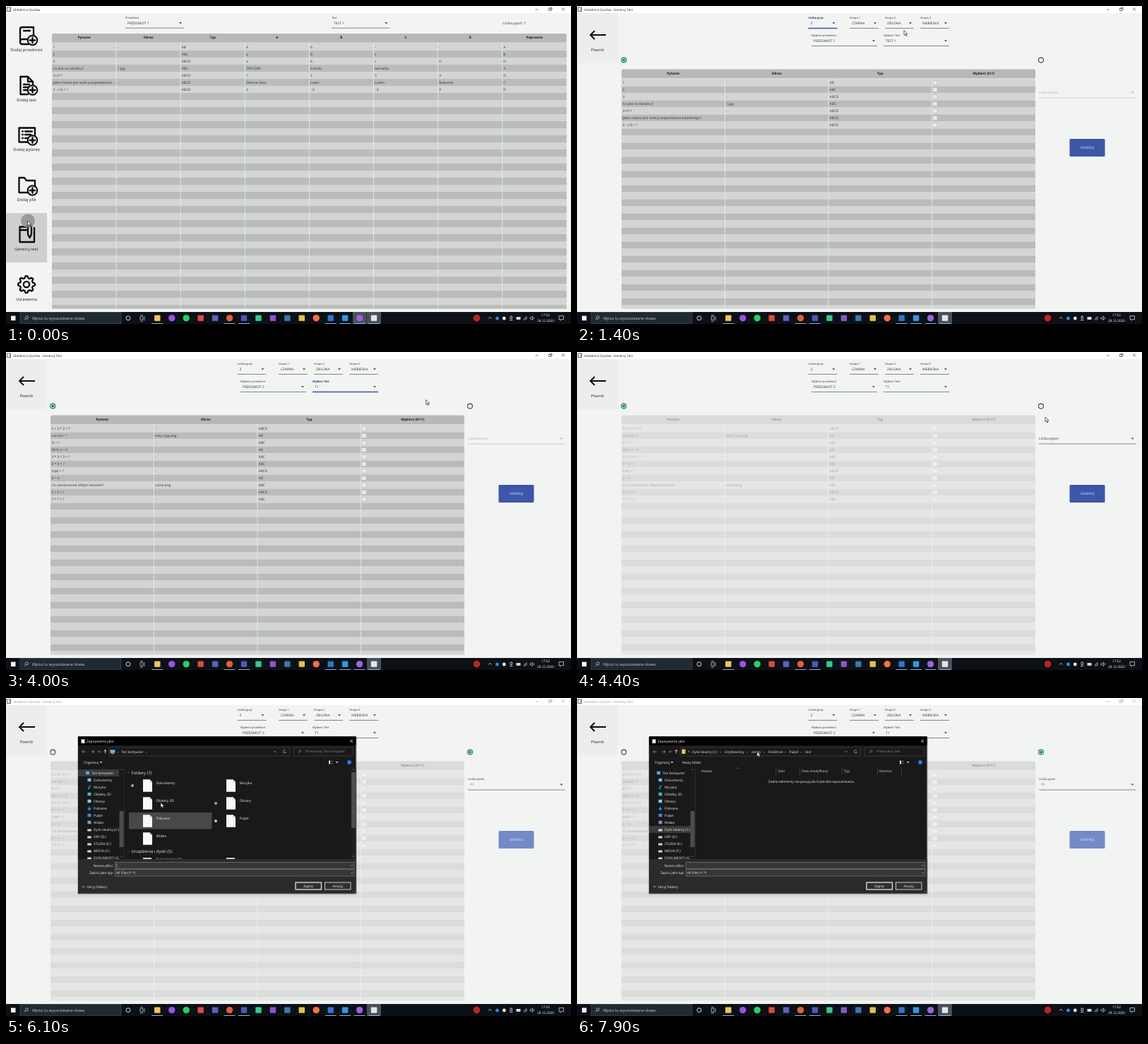
An HTML page for the animation above (8 s loop, 800 by 450 pixels).

```html
<!DOCTYPE html>
<html lang="pl">
<head>
<meta charset="utf-8">
<title>Układnica Quizów</title>
<style>
html, body { margin: 0; width: 100%; height: 100%; overflow: hidden; background: #f1f4f1; }
svg { display: block; width: 800px; height: 450px; }
text { font-family: "Open Sans", "Noto Sans", sans-serif; text-rendering: geometricPrecision; white-space: pre; }
.icon { fill: none; stroke: #0a0a0a; stroke-width: 2.3; stroke-linejoin: round; stroke-linecap: round; }
</style>
</head>
<body>
<svg id="stage" viewBox="0 0 800 450"></svg>
<script>
const LOOP = 8000, STEP = 100;
const INK = '#303330', BLUE = '#3f51b5';

// drawing helpers
const rect = (x, y, w, h, fill, more = '') =>
  `<rect x="${x}" y="${y}" width="${w}" height="${h}" fill="${fill}" ${more}/>`;
const disc = (x, y, r, fill, more = '') =>
  `<circle cx="${x}" cy="${y}" r="${r}" fill="${fill}" ${more}/>`;
const path = (d, stroke, width = 0.8, more = '') =>
  `<path d="${d}" fill="none" stroke="${stroke}" stroke-width="${width}" ${more}/>`;
const text = (x, y, s, size = 4.8, fill = INK, more = '') =>
  `<text x="${x}" y="${y + size * 0.36}" font-size="${size}" fill="${fill}" ${more}>${s}</text>`;
const MID = 'text-anchor="middle"', BOLD = MID + ' font-weight="700"';
const group = (s, more = '') => `<g ${more}>${s}</g>`;
const during = (from, to, s, more = '') => group(s, `data-from="${from}" data-to="${to}" ${more}`);
const arrow = (x, y, fill = '#444') => `<path d="M${x - 2} ${y - 1}h4l-2 2.2z" fill="${fill}"/>`;

function combo(x, right, y, label, value, focus) {
  const line = (c, w) => path(`M${x} ${y + 7.2}H${right}`, c, w);
  return text(x, y - 7.5, label, 4) + text(x + 3, y, value) + arrow(right - 5, y) + line('#686b68', 0.8) +
    (focus ? during(...focus, line(BLUE, 1.3) + text(x, y - 7.5, label, 4, BLUE)) : '');
}

// striped table body with header
function grid(x, top, cols, width, heads) {
  let s = '';
  const right = x + cols * width, first = top + 14;
  for (let y = first, i = 0; y < 428.5; y += 10, i++)
    s += rect(x, y, right - x, Math.min(10, 428.5 - y), i % 2 ? '#b9bcb9' : '#d2d5d2');
  s += rect(x, top + 10, right - x, 4, '#d2d5d2');
  for (let i = 1; i < cols; i++)
    s += path(`M${x + i * width} ${top + 12}V428.5`, '#e6e9e6', 0.9);
  s += rect(x, top + 1, right - x, 11.5, '#9fa29f', 'rx="3" opacity=".5"') +
    rect(x, top, right - x, 11.5, '#b6b9b6', 'rx="3"');
  heads.forEach((h, i) => s += text(x + (i + 0.5) * width, top + 5.6, h, 4.7, '#161816', BOLD));
  return s;
}
const cells = (x, top, width, rows) => rows.map((row, r) =>
  row.split('|').map((c, i) => text(x + 1.6 + i * width, top + 19 + r * 10, c)).join('')).join('');

// start page
const plus = (x, y) => disc(x, y, 6.8, '#f1f4f1', 'stroke-width="2"') +
  `<path d="M${x - 3.8} ${y}h7.6M${x} ${y - 3.8}v7.6"/>`;
const gear = () => {
  let d = '';
  for (let i = 0; i < 32; i++) {
    const a = (i - 1.5) * Math.PI / 16, r = i % 4 === 1 || i % 4 === 2 ? 12 : 9.2;
    d += `${i ? 'L' : 'M'}${(29 + r * Math.sin(a)).toFixed(1)} ${(394 - r * Math.cos(a)).toFixed(1)}`;
  }
  return `<path d="${d}Z"/><circle cx="29" cy="394" r="4.2"/>`;
};
const menu = [
  ['Dodaj przedmiot', '<path d="M39 43V30H23q-3 0-3 3v18q0 3 3 3h9M20 51q0-4 3-4h9M25 35h9"/>' + plus(37.5, 48.5)],
  ['Dodaj test', '<path d="M31 125H20.500V100H31l7 7v6M31 100v7h7M25 111h8M25 115h6M25 119h5"/>' + plus(37.500, 119)],
  ['Dodaj pytanie', '<path d="M31 192.500H18.500v-20H41v12M23 177.500h1M27 177.500h10M23 182h1M27 182h8M23 187h1M27 187h4"/>' + plus(37.500, 190)],
  ['Dodaj plik', '<path d="M31 264H18.500V243H26l3 4h12v8"/>' + plus(37.500, 261)],
  ['Generuj test', '<path d="M40 314v20H19.500V312.500H31M20 317h10M31 311h5v12l-2.500 5l-2.500-5z"/>'],
  ['Ustawienia', gear()]
];
const heads1 = ['Pytanie', 'Obraz', 'Typ', 'A', 'B', 'C', 'D', 'Poprawne'];
const rows1 = [
  '1|-|AB|A|b|-|-|A', '2|-|ABC|a|B|c|-|B', '3|-|ABCD|a|b|c|D|D',
  'Co jest na obrazku?|1.jpg|ABC|TAPCZAN|krzesło|wersalka|-|A', '2+2=?|-|ABCD|1|2|3|4|D',
  'Jakie miasto jest stolicą województwa ...|-|ABCD|Zielona Góra|Lubin|Lublin|Białystok|C',
  '3 - (-5) = ?|-|ABCD|3|- 2|- 8|8|D'
];
const startPage = rect(0, 293, 58, 70, '#cdd0cd') +
  menu.map(([name, icon], i) => group(icon, 'class="icon"') + text(29, 62 + i * 70.6, name, 5.8, '#222', MID)).join('') +
  combo(169, 252, 24, 'Przedmiot', 'PRZEDMIOT 1') + combo(461, 543.5, 24, 'Test', 'TEST 1') +
  text(703, 24, 'Liczba pytań: 7') +
  grid(65, 39, 8, 91.1, heads1) + cells(65, 39, 91.1, rows1) +
  disc(31, 304, 9.8, '#8b8d8b', 'opacity=".8"');

// generator page
const rows2 = [
  '1|-|AB', '2|-|ABC', '3|-|ABCD', 'Co jest na obrazku?|1.jpg|ABC', '2+2=?|-|ABCD',
  'Jakie miasto jest stolicą województwa lubelskiego?|-|ABCD', '3 - (-5) = ?|-|ABCD'
];
const rows3 = [
  '2 + 2 * 2 = ?|-|ABCD', 'cos (α) = ?|Katy_tryg.png|AB', '5! = ?|-|ABC', '98 % 2 = 0|-|AB',
  '3 * 3 * 3 = ?|-|ABC', '9 * 9 = ?|-|ABC', 'ln(e) = ?|-|ABCD', 'π = e|-|AB',
  'Co zaznaczonoe żółtym kolorem?|suma.png|ABC', '2 + 2 = ?|-|ABCD', '7 * 7 = ?|-|ABC'
];
const picker = rows => grid(63, 89.5, 4, 146.5, ['Pytanie', 'Obraz', 'Typ', `Wybierz (0/${rows.length})`]) +
  cells(63, 89.5, 146.5, rows) +
  rows.map((_, i) => rect(503.7, 105.4 + i * 10, 6.4, 6.2, '#e9ebe9', 'rx=".8" stroke="#a9aca9" stroke-width=".5"')).join('');
const radio = (x, on) => disc(x, 76.6, 3.5, on ? '#dcebe4' : 'none', `stroke="${on ? '#0f8063' : '#444'}" stroke-width="1.1"`) +
  (on ? disc(x, 76.6, 1.9, '#0f8063') : '');
const button = (fill, ink = '#e8ecf8') => rect(697.5, 188, 50, 25, fill, 'rx="1.5"') + text(722.5, 200.6, 'GENERUJ', 4.6, ink, MID);
const countLine = path('M654 130H791.5', '#686b68') + arrow(786.5, 122.5);
const countEmpty = text(654, 122.5, 'Liczba pytań') + countLine;

const makerPage = rect(0, 10, 58, 71, '#ebeeeb') +
  path('M41 41H19M25 35l-6 6l6 6', '#0a0a0a', 1.9) + text(29, 62, 'Powrót', 5.6, '#222', MID) +
  during(300, 1000, combo(327.500, 368.500, 24.300, 'Liczba grup', '1')) +
  during(1000, LOOP, combo(327.5, 368.5, 24.3, 'Liczba grup', '3', [1000, 1700])) +
  combo(386, 427, 24.3, 'Grupa 1', 'CZARNA') +
  during(1000, LOOP, combo(436, 477, 24.3, 'Grupa 2', 'ZIELONA') + combo(486, 527, 24.3, 'Grupa 3', 'NIEBIESKA')) +
  during(300, 2800, combo(332, 425, 49.3, 'Wybierz przedmiot', 'PRZEDMIOT 1', [1700, 2800]) +
    combo(434, 527, 49.3, 'Wybierz Test', 'TEST 1') + picker(rows2)) +
  during(2800, LOOP, combo(332, 425, 49.3, 'Wybierz przedmiot', 'PRZEDMIOT 2', [2800, 3500]) +
    combo(434, 527, 49.3, 'Wybierz Test', 'T1', [3500, 4200])) +
  during(2800, 4300, picker(rows3)) + during(4300, LOOP, picker(rows3), 'opacity=".4"') +
  during(300, 4500, radio(66.3, true) + radio(657, false)) +
  during(4500, LOOP, radio(66.3, false) + radio(657, true)) +
  during(300, 4300, countEmpty, 'opacity=".35"') + during(4300, 5300, countEmpty) +
  during(5300, LOOP, text(654, 115, 'Liczba pytań', 4) + text(657, 122.5, '11') + countLine) +
  during(300, 5600, button('#3b57a9')) +
  during(5600, 5900, button('#5cb98d', '#9fd5bd') + rect(698, 188.5, 49, 24, 'none', 'rx="1.5" stroke="#6d9fa9"')) +
  during(5900, LOOP, button('#748ac8'));

// window frame
const frame = (name, ink) => text(10, 4.9, name, 4.6, ink) +
  path('M749.500 5h4M768.500 3.500h3v3h-3zM770 3.500v-1h3v3h-1.500M787 2.500l4 4M791 2.500l-4 4', ink, 0.6);
const titleBar = rect(0, 0, 800, 10, '#fff') +
  rect(1.5, 2, 5, 5.5, '#fff', 'stroke="#555" stroke-width=".9"') + path('M5 3.500v3', '#555', 0.8) +
  during(0, 300, frame('Układnica Quizów', '#222')) +
  during(300, 5700, frame('Układnica Quizów - Generuj Test', '#222')) +
  during(5700, LOOP, frame('Układnica Quizów - Generuj Test', '#999'));

// taskbar: shape (c circle, s square) and colour per app
const apps = 's#f3c650 c#a04cf0 c#1ed760 s#e2493a s#5a62c4 c#f05a2c s#495bb4 s#2bcf8c s#8c55cc s#3d78ad s#e5c243 c#ff6f3c s#2b78d0 s#2b9be6 c#9d62dc s#e9e6dc'.split(' ');
const openApps = [0, 5, 6, 12, 13, 14, 15];
const appX = i => 214.3 + i * 20.45;
const taskbar = rect(0, 433, 800, 17, '#0b1117') + rect(7, 438.5, 6.5, 6.5, '#f4f4f4') +
  rect(20, 433.6, 143, 16.4, '#202a32', 'stroke="#46505a" stroke-width=".6"') +
  disc(29.5, 440.8, 2, 'none', 'stroke="#ddd" stroke-width=".7"') + path('M28 442.300l-2 2', '#ddd') +
  text(37, 441.8, 'Wpisz tu wyszukiwane słowa', 5.6, '#c8ccd0') +
  disc(173, 441.7, 3, 'none', 'stroke="#eee" stroke-width=".9"') +
  path('M190 439.500h4v4.500h-4zM196 439v6M190 437.500h4M190 446h4', '#ddd', 0.7) +
  during(0, 300, rect(491, 433, 19.5, 17, '#48535c')) + rect(511, 433, 20, 17, '#46515b') +
  apps.map((a, i) => {
    const c = a.slice(1), x = appX(i);
    return (a[0] === 'c' ? disc(x, 441.600, 4.700, c) : rect(x - 4.2, 437.4, 8.4, 8.4, c, 'rx=".8"')) +
      (openApps.includes(i) ? rect(x - 8, 449, 16, 1, '#76b9ed') : '');
  }).join('') +
  disc(666.5, 441.6, 4.8, '#c6201f') +
  path('M683 442.500l2.300-2.300l2.300 2.300', '#eee', 0.8) + disc(695.5, 442, 2.4, '#2f8ee0') + disc(705.300, 442, 2.400, '#eee') +
  path('M714 439h2.500v3.500h-2.500zM713 444.500h4.500', '#ddd', 0.8) +
  rect(722.5, 440, 6, 3.8, '#ddd') +
  path('M733.500 444.500a4.500 4.500 0 0 1 4.500-4.500M735.500 444.500a2.500 2.500 0 0 1 2.500-2.500', '#ddd', 0.8) +
  path('M742 440.800h1.500l2-1.800v5.500l-2-1.800h-1.500zM747 440q1.500 1.700 0 3.500', '#ddd', 0.7) +
  text(764, 437.7, '17:52', 4.7, '#fff', MID) + text(764, 445.6, '28.12.2020', 4.7, '#fff', MID) +
  path('M783 438.500h6.500v5h-3l-1.500 1.700v-1.700h-2z', '#eee', 0.7);

// save dialog
const PALE = '#ececec', DIM = '#8c8c8c';
const places = ['Ten komputer', 'Dokumenty', 'Muzyka', 'Obiekty 3D', 'Obrazy', 'Pobrane', 'Pulpit', 'Wideo',
  'Dysk lokalny (C:)', 'GRY (D:)', 'STUDIA (E:)', 'MEDIA (F:)', 'DOKUMENTY (G'];
const tint = ['#4aa9e8', '#7fb9e6', '#2a93e8', '#38b6d8', '#8cc5ec', '#2f8fe4', '#2f8fe4', '#8a9aa8'];
const sideBar = chosen => rect(102, 101 + chosen * 10, 58, 10, '#3a3a3a') +
  places.map((p, i) => {
    const x = i ? 118 : 115.5, y = 106 + i * 10;
    const mark = i > 7 ? rect(x - 2.8, y - 0.6, 5.6, 3, '#d5d5d5', 'rx=".5"') :
      i === 5 ? path(`M${x} ${y - 2.500}v5M${x - 2} ${y}l2 2.500l2-2.500`, tint[i], 1.3) :
      i === 2 ? path(`M${x} ${y + 2}v-4.500l2 1.500`, tint[i], 1) + disc(x - 1, y + 1.8, 1.3, tint[i]) :
      rect(x - 2.5, y - 2.2, 5, 4.4, tint[i], 'rx=".6"');
    return mark + text(x + 6, y, p, 4.8, PALE);
  }).join('') + rect(160, 98, 7, 130, '#1a1a1a') + rect(160.5, 160, 6, 51, '#4d4d4d') +
  path('M162 102l1.500-1.500l1.500 1.500M162 223.500l1.500 1.500l1.500-1.500', DIM, 0.6) + rect(167.300, 98, 0.700, 130, '#333');

const sheet = (x, y) => `<path d="M${x} ${y}h9.500l3.500 3.500v14h-13z" fill="#f7f7f3"/>` +
  path(`M${x + 9.500} ${y}v3.500h3.500`, '#b9b9b0', 0.6);
const folders = ['Dokumenty', 'Muzyka', 'Obiekty 3D', 'Obrazy', 'Pobrane', 'Pulpit', 'Wideo'];
const computerView = sideBar(0) + disc(151, 76, 0, 'none') +
  rect(147.5, 73.3, 7, 4.4, '#5bb8ee') + rect(149, 78.3, 4, 0.8, '#ddd') +
  text(158, 75.8, '›   Ten komputer   ›', 4.8, PALE) + text(424, 75.8, 'Przeszukaj: Ten komputer', 4.7, DIM) +
  rect(174.5, 162.5, 116.5, 22.5, '#484848', 'stroke="#606060" stroke-width=".5"') +
  path('M172.200 104.800l1.200 1.200l1.200-1.200M172.200 216.300l1.200 1.200l1.200-1.200', DIM, 0.5) +
  text(177.5, 105.5, 'Foldery (7)', 5.9, PALE) + text(177.5, 217, 'Urządzenia i dyski (5)', 5.9, PALE) +
  folders.map((f, i) => {
    const x = i % 2 ? 312 : 194, y = 115.2 + (i >> 1) * 25;
    return sheet(x, y) + text(x + 18.7, y + 4.8, f, 4.9, PALE);
  }).join('') +
  disc(179, 124, 2, '#6fb0e6') + disc(297, 149, 2, '#6fb0e6') + disc(297, 174, 2, '#c8c8c8') +
  rect(194, 226, 12, 3, '#ccc') + text(212.5, 228, 'Dysk lokalny (C:)', 4.9, PALE) + rect(312, 226, 12, 3, '#ccc') +
  rect(488.5, 98, 7, 130, '#1e1e1e') + rect(489, 105, 6, 79, '#4d4d4d') +
  path('M490.500 102l1.500-1.500l1.500 1.500M490.500 223.500l1.500 1.500l1.500-1.500', DIM, 0.6);

const trail = [[163, 'Dysk lokalny (C:)'], [209, 'Użytkownicy'], [247, 'zenko'], [270.5, 'OneDrive'], [300.5, 'Pulpit'], [323, 'test']];
const columns = [[176, 'Nazwa'], [284.5, 'Stan'], [318, 'Data modyfikacji'], [378, 'Typ'], [428, 'Rozmiar']];
const emptyView = sideBar(8) + rect(148.5, 72.5, 5, 6.5, '#f0c95a') + text(157, 75.8, '«', 4.6, PALE) +
  trail.map(([x, s], i) => text(x, 75.8, s, 4.8, PALE) + (i ? text(x - 6.5, 75.8, '›', 4.8, PALE) : '')).join('') +
  text(424, 75.8, 'Przeszukaj: test', 4.7, DIM) + text(149, 91, 'Nowy folder', 4.8, PALE) +
  columns.map(([x, s]) => text(x, 103.3, s, 4.8, '#d6d6d6')).join('') +
  [281.5, 315, 375, 425, 459].map(x => rect(x, 98.5, 0.6, 10, '#555')).join('') +
  path('M226 100l1.500-1.500l1.500 1.500', DIM, 0.6) +
  text(332, 118, 'Żadne elementy nie pasują do kryteriów wyszukiwania.', 4.8, PALE, MID);

const field = (y, label, value) => text(152, y, label, 4.8, PALE, 'text-anchor="end"') +
  rect(154.5, y - 4.6, 338.500, 9.2, '#363636', 'stroke="#858585" stroke-width=".6"') + text(156, y, value, 4.8, PALE) +
  path(`M488 ${y - 0.600}l1.500 1.500l1.500-1.500`, '#ccc', 0.6);
const choice = (x, s, w) => rect(x, 261, 36.5, 10, '#303030', `stroke="#f0f0f0" stroke-width="${w}"`) + text(x + 18.2, 266, s, 4.8, '#fff', MID);
const dialog = rect(101, 54.5, 396, 224, '#000', 'opacity=".18" rx="2"') + rect(102, 54.5, 393.5, 222, '#191919') +
  rect(102, 54.5, 393.5, 12.5, '#000') + rect(106.5, 58.500, 5, 5.500, '#eee', 'stroke="#777" stroke-width=".6"') +
  text(114, 61, 'Zapisywanie jako', 4.9, '#fff') + path('M487.200 59l4 4M491.200 59l-4 4', '#fff', 0.7) +
  path('M112.500 76h-4.500M110 74l-2 2l2 2M120.500 76h4.500M123 74l2 2l-2 2', '#aaa', 0.7) +
  path('M130.500 75.300l1.500 1.500l1.500-1.500M140.500 78.500v-5M138.500 75.300l2-2l2 2', '#eee', 0.8) +
  rect(146, 70, 255.500, 12, '#191919', 'stroke="#4a4a4a" stroke-width=".6"') +
  rect(407, 70, 84, 12, '#191919', 'stroke="#4a4a4a" stroke-width=".6"') +
  path('M379.500 75.300l1.500 1.500l1.500-1.500M396 74.500a2 2 0 1 0 .5 1.500', '#ccc', 0.7) +
  disc(416.5, 75, 1.5, 'none', `stroke="${DIM}" stroke-width=".6"`) + path('M415.300 76.300l-1.800 1.800', DIM, 0.7) +
  text(110, 91, 'Organizuj', 4.8, PALE) + arrow(134.5, 91, '#ccc') +
  rect(457, 88.5, 2.2, 5, '#ddd') + path('M460.500 89.500h2M460.500 92.500h2', '#999') + arrow(468.500, 91, '#ccc') +
  disc(486, 91, 3, '#1672d8') + text(486, 91, '?', 4.5, '#fff', MID) +
  during(5900, 7000, computerView) + during(7000, LOOP, emptyView) +
  rect(102, 228, 393.5, 48.5, '#2b2b2b') + field(237, 'Nazwa pliku:', '') + field(247.4, 'Zapisz jako typ:', 'All Files (*.*)') +
  during(5900, 6400, path('M157 234v6', '#fff', 0.5)) +
  path('M108 268l1.800-1.800l1.800 1.800', '#ddd') + text(114.5, 267, 'Ukryj foldery', 4.8, PALE) +
  choice(410, 'Zapisz', 1.2) + choice(451.5, 'Anuluj', 0.8) + path('M494.500 273l-2.500 2.500M494.500 275v.500', '#888', 0.6);

const pointer = '<path id="pointer" d="M0 0V6.800L1.600 5.400L2.700 8L3.900 7.500L2.800 5H5z" fill="#fff" stroke="#222" stroke-width=".7"/>';
const stage = document.getElementById('stage');
stage.innerHTML = rect(0, 0, 800, 450, '#f1f4f1') + during(0, 300, startPage) + during(300, LOOP, makerPage) +
  titleBar + taskbar + during(5900, LOOP, dialog) + pointer;

// pointer route: time, x, y
const route = [
  [0, 30.5, 304], [200, 30.5, 304], [700, 345, 24], [1000, 340, 40], [1400, 463, 34.5], [1600, 395, 48], [1900, 395, 48],
  [2300, 380, 70], [2700, 380, 70], [3000, 460.5, 52], [3400, 480, 50], [3700, 480, 50], [4200, 657, 77], [4400, 663, 92],
  [4800, 715, 122], [5200, 705, 150], [5600, 710, 195], [5700, 710, 195], [6100, 219, 148], [6600, 335, 170],
  [7000, 335, 170], [7800, 255, 76], [LOOP, 255, 76]
];
const parts = [...stage.querySelectorAll('[data-from]')].map(el => [el, +el.dataset.from, +el.dataset.to]);
const hand = document.getElementById('pointer');

function show(now) {
  const t = Math.floor(now % LOOP / STEP) * STEP;
  for (const [el, from, to] of parts) el.style.display = t >= from && t < to ? '' : 'none';
  const i = route.findIndex(p => p[0] > t);
  const [t0, x0, y0] = route[i - 1], [t1, x1, y1] = route[i];
  const k = (t - t0) / (t1 - t0), e = k * k * (3 - 2 * k);
  hand.setAttribute('transform', `translate(${x0 + (x1 - x0) * e} ${y0 + (y1 - y0) * e})`);
}
const begin = performance.now();
function tick() {
  show(performance.now() - begin);
  requestAnimationFrame(tick);
}
tick();
</script>
</body>
</html>
```
